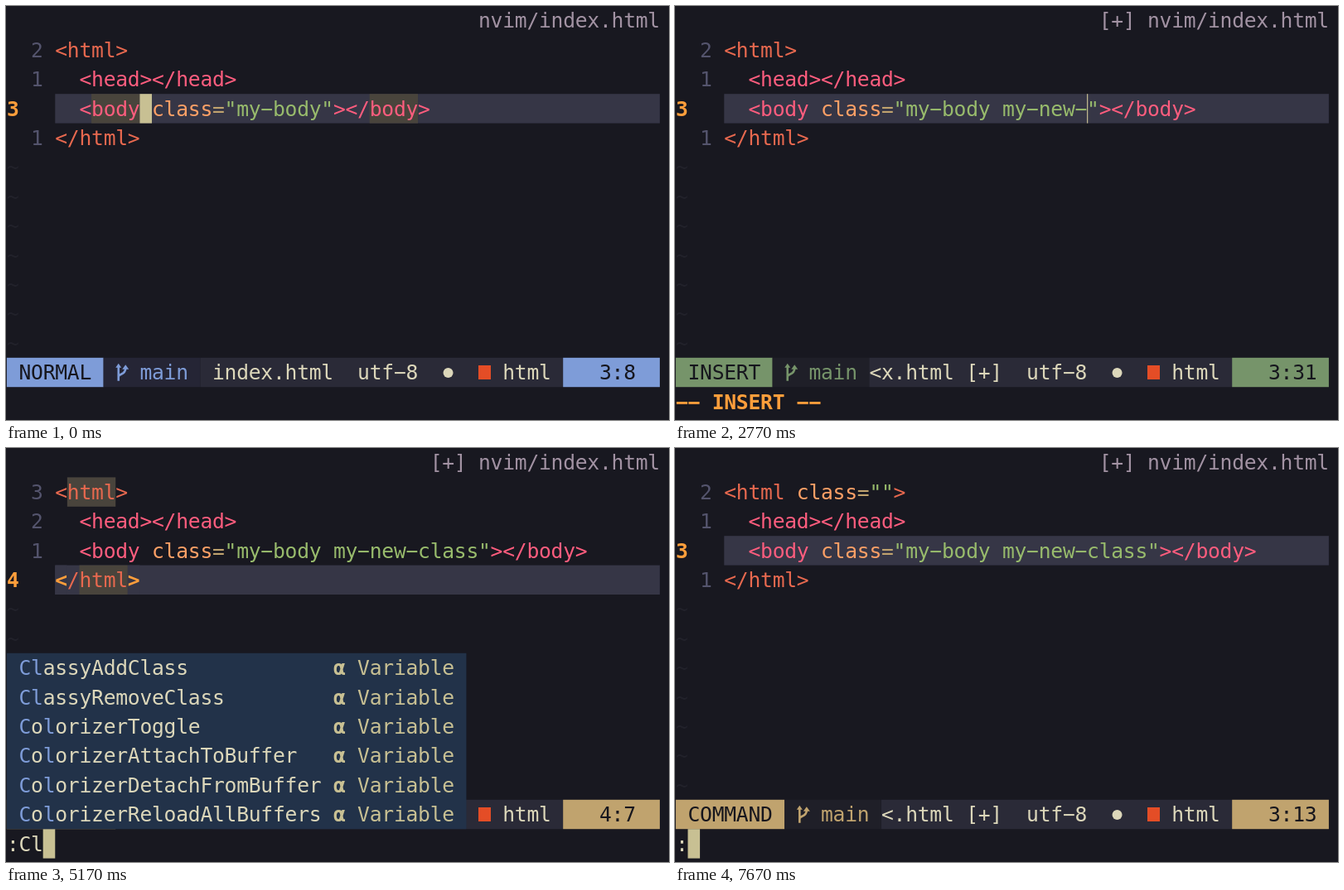
These frames come from a looping animation (800x500 px, 8 s). An HTML page with a canvas:

```html
<!DOCTYPE html>
<html lang="en">
<head>
<meta charset="utf-8">
<title>Editing class attributes</title>
<style>
html, body { margin: 0; height: 100%; overflow: hidden; background: #181820; }
canvas { display: block; width: 800px; height: 500px; }
</style>
</head>
<body>
<canvas id="stage" width="800" height="500"></canvas>
<script>
const ctx = document.getElementById('stage').getContext('2d');
const LOOP = 8000, CW = 14.593, RH = 35.4, X0 = 0.9, COLS = 54, STATUS = 12, CMD = 13;
const C = {
  bg: '#181820', dark: '#16161d', line: '#363646', num: '#54546d', tilde: '#22222b',
  gold: '#ff9e3b', root: '#e8694f', tag: '#ff5d7e', attr: '#ffa066', op: '#c0a36e',
  str: '#98bb6c', fg: '#dcd7ba', cursor: '#c8c093', word: '#49443c', title: '#a292a3',
  bar: '#2a2a37', menu: '#223249', pick: '#2d4f67', match: '#7e9cd8'
};
const MODES = {
  NORMAL: { color: '#7e9cd8', branch: '#252535' },
  INSERT: { color: '#76946a', branch: '#1f1f28' },
  COMMAND: { color: '#c0a36e', branch: '#1f1f28' }
};

const NAMES = ['ClassyAddClass', 'ClassyRemoveClass', 'ColorizerToggle', 'ColorizerAttachToBuffer',
  'ColorizerDetachFromBuffer', 'ColorizerReloadAllBuffers'];
function menuFor(query) {
  if (query === 'C') return ['CmpStatus', ...NAMES];
  return query === 'Cl' ? NAMES : NAMES.slice(0, 2);
}

// Timeline: each step overrides part of the state.
const steps = [];
const at = (time, change) => steps.push([time, change]);
const type = (start, gap, text, fn) => [...text].forEach((_, i) => fn(start + i * gap, text.slice(0, i + 1)));

function command(open, start, gap, lag, pick) {
  at(open, { mode: 'COMMAND', cmd: '' });
  type(start, gap, 'Classy', (t, cmd) => {
    at(t, { cmd });
    at(t + lag, { query: cmd });
  });
  at(pick, { cmd: NAMES[0], picked: true });
}
const closed = { query: '', picked: false, words: '', pair: false };
const added = text => ({ extra: ' ' + text, col: 23 + text.length });

at(0, { mode: 'NORMAL', line: 3, col: 7, extra: '', words: 'body', query: '' });
command(300, 630, 108, 40, 1330);
at(1670, { ...closed, mode: 'INSERT', dirty: true, ...added('') });
type(2000, 120, 'my-new', (t, s) => at(t, added(s)));
at(2770, added('my-new-'));
type(2970, 82, 'class', (t, s) => at(t, added('my-new-' + s)));
at(3670, { mode: 'NORMAL', col: 34 });
at(4130, { line: 4, col: 6, pair: true });
at(4270, { words: 'html' });
command(4630, 5000, 88, 30, 5630);
at(5800, { ...closed, mode: 'INSERT', line: 1, col: 13, rootAttr: true });
at(6670, { mode: 'NORMAL', col: 12 });
at(7070, { line: 2 });
at(7230, { line: 3 });
at(7670, { mode: 'COMMAND', cmd: '' });
steps.sort((a, b) => a[0] - b[0]);

const stateAt = t => Object.assign({}, ...steps.filter(s => s[0] <= t).map(s => s[1]));

// Drawing on the character grid.
const x = col => X0 + col * CW;
function fill(col, row, width, color, height = 1) {
  ctx.fillStyle = color;
  ctx.fillRect(x(col), row * RH, width * CW, height * RH);
}
function put(col, row, text, color, bold) {
  ctx.font = (bold ? 'bold ' : '') + '24.7px "DejaVu Sans Mono", monospace';
  ctx.fillStyle = color;
  [...text].forEach((ch, i) => ctx.fillText(ch === '-' ? '\u2212' : ch, x(col + i), row * RH + 26.4));
}

function source(s) {
  const attr = value => [[' class', C.attr], ['=', C.op], ['"' + value + '"', C.str]];
  return [
    [['<html', C.root], ...(s.rootAttr ? attr('') : []), ['>', C.root]],
    [['  <head></head>', C.tag]],
    [['  <body', C.tag], ...attr('my-body' + s.extra), ['></body>', C.tag]],
    [['</html>', C.root]]
  ];
}

function drawText(s) {
  fill(4, s.line, COLS - 4, C.line);
  source(s).forEach((parts, i) => {
    const row = i + 1, full = parts.map(p => p[0]).join('');
    if (s.words) {
      for (const hit of full.matchAll(new RegExp('(?<=[</])' + s.words, 'g')))
        fill(4 + hit.index, row, s.words.length, C.word);
    }
    let col = 4;
    for (const [text, color] of parts) {
      put(col, row, text, color);
      col += text.length;
    }
    if (row === s.line) {
      put(0, row, String(row), C.gold, true);
      if (s.pair) {
        for (const k of [0, 6]) {
          fill(4 + k, row, 1, C.line);
          put(4 + k, row, full[k], C.gold, true);
        }
      }
      if (s.mode === 'NORMAL') {
        fill(4 + s.col, row, 1, C.cursor);
        put(4 + s.col, row, full[s.col], C.dark, s.pair);
      } else if (s.mode === 'INSERT') {
        fill(4 + s.col, row, 0.08, C.cursor);
      }
    } else {
      put(2, row, String(Math.abs(row - s.line)), C.num);
    }
  });
  for (let row = 5; row < STATUS; row++) put(0, row, '~', C.tilde);
}

function drawBranch(col, color) {
  ctx.save();
  ctx.translate(x(col), STATUS * RH);
  ctx.strokeStyle = ctx.fillStyle = color;
  ctx.lineWidth = 2.6;
  ctx.stroke(new Path2D('M3.5 11V28M3.5 23C3.5 19 12 21 12 13'));
  ctx.fill(new Path2D('M0 12L3.5 7L7 12ZM8 14L12 8.5L16 14Z'));
  ctx.restore();
}

function drawStatus(s) {
  const { color, branch } = MODES[s.mode], end = s.mode.length + 2, from = end + 8;
  fill(0, STATUS, end, color);
  put(1, STATUS, s.mode, C.dark);
  fill(end, STATUS, 8, branch);
  drawBranch(end + 1, color);
  put(end + 3, STATUS, 'main', color);
  fill(from, STATUS, 46 - from, C.bar);
  if (s.dirty) put(from, STATUS, '<' + 'index.html [+]'.slice(from - 26), C.fg);
  else put(from + 1, STATUS, 'index.html', C.fg);
  put(29, STATUS, 'utf-8', C.fg);
  ctx.fillStyle = C.fg;
  ctx.beginPath();
  ctx.arc(x(36.5), 443, 6, 0, 7);
  ctx.fill();
  ctx.fillStyle = '#e44d26';
  ctx.fillRect(570, 434, 15, 17);
  put(41, STATUS, 'html', C.fg);
  fill(46, STATUS, 8, color);
  put(49, STATUS, s.line + ':' + (s.col + 1), C.dark);
}

function drawMenu(s) {
  const items = menuFor(s.query), top = CMD - items.length;
  const kind = 2 + Math.max(...items.map(n => n.length));
  fill(0, top, kind + 11, C.menu, items.length);
  items.forEach((name, i) => {
    const row = top + i;
    if (s.picked && i === 0) fill(0, row, kind + 11, C.pick);
    let hit = 0;
    [...name].forEach((ch, k) => {
      const on = ch === s.query[hit];
      if (on) hit++;
      put(1 + k, row, ch, on ? C.match : C.fg);
    });
    put(kind, row, '\u03b1', C.cursor, true);
    put(kind + 2, row, 'Variable', C.cursor);
  });
}

function draw(t) {
  const s = stateAt(t);
  ctx.fillStyle = C.bg;
  ctx.fillRect(0, 0, 800, 500);
  const title = (s.dirty ? '[+] ' : '') + 'nvim/index.html';
  put(COLS - title.length, 0, title, C.title);
  drawText(s);
  drawStatus(s);
  if (s.mode === 'INSERT') put(0, CMD, '-- INSERT --', C.gold, true);
  if (s.mode === 'COMMAND') {
    put(0, CMD, ':' + s.cmd, C.fg);
    fill(1 + s.cmd.length, CMD, 1, C.cursor);
    if (s.query) drawMenu(s);
  }
}

function tick() {
  draw(performance.now() % LOOP);
  requestAnimationFrame(tick);
}
tick();
</script>
</body>
</html>
```
